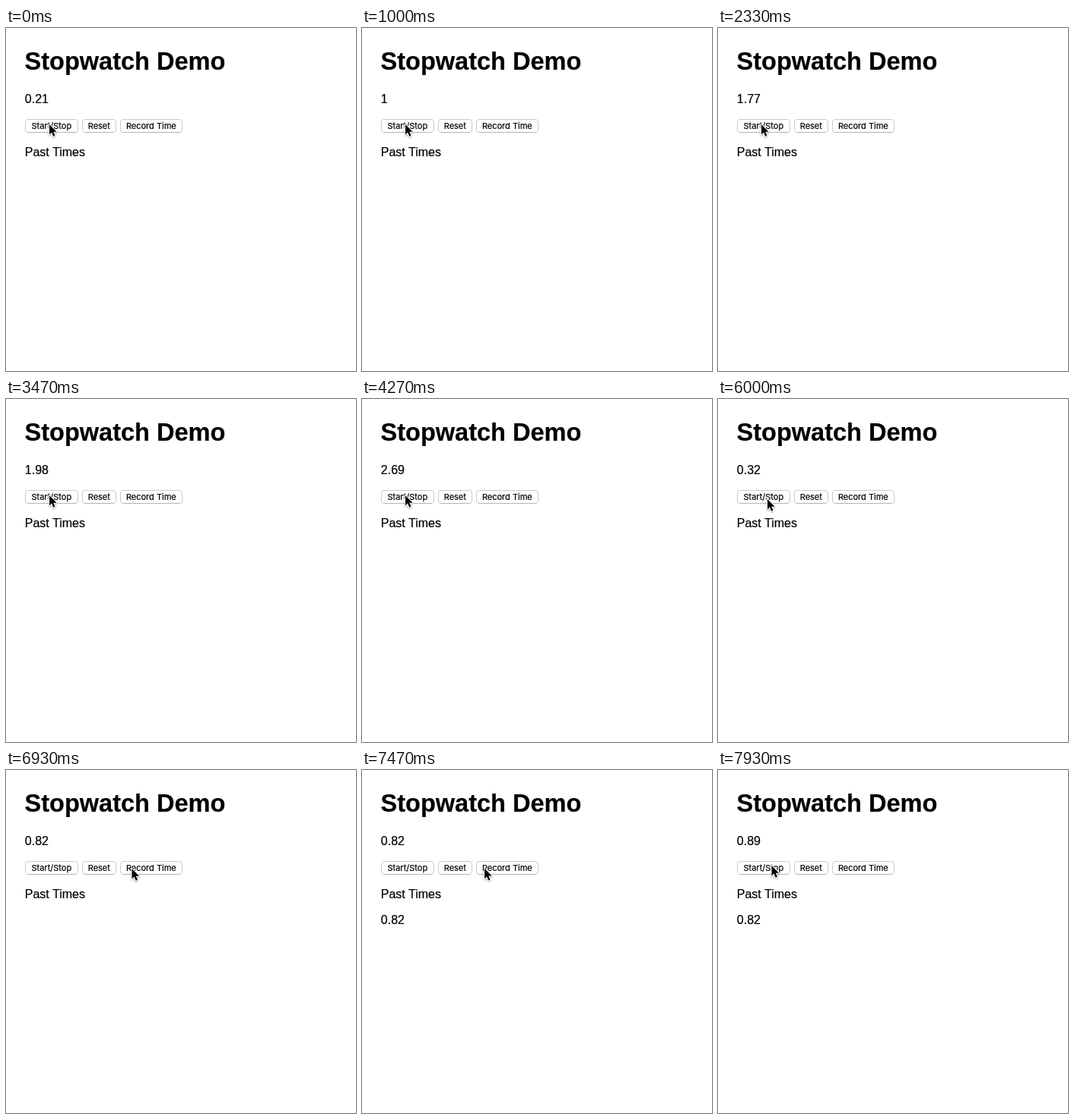
Write an HTML page that moves like this. It is 460 px wide and 452 px high and loops after 8000 ms.

```html
<!DOCTYPE html>
<html lang="en">
<head>
<meta charset="utf-8">
<title>Stopwatch Demo</title>
<style>
  html, body { margin: 0; width: 100%; height: 100%; overflow: hidden; background: #fff; }
  svg { display: block; width: 460px; height: 452px; }
  text { font: 16px "Liberation Sans", Arial, sans-serif; stroke: #000; stroke-width: .2px; }
  .title { font-size: 32.5px; font-weight: bold; }
  .button text { font: 11px Inter, sans-serif; text-anchor: middle; }
  .button rect { fill: #fff; stroke: #cbcbcb; }
  .button path { stroke: #b4b4b4; }
  .pressed rect { fill: url(#blue); stroke: #3d8df5; }
  .pressed path { stroke: #0a52d0; }
  .pressed text { fill: #fff; stroke: #fff; }
  #cursor { filter: drop-shadow(0 1px 1px rgba(0, 0, 0, .35)); }
  #cursor path { stroke: #fff; stroke-width: 2; stroke-linejoin: round; paint-order: stroke; }
</style>
</head>
<body>
<svg viewBox="0 0 460 452">
  <defs>
    <linearGradient id="blue" x2="0" y2="1">
      <stop stop-color="#69b2fa"/>
      <stop offset="1" stop-color="#0d69fb"/>
    </linearGradient>
  </defs>
  <text class="title" x="24.6" y="55">Stopwatch Demo</text>
  <text id="time" x="24.8" y="99"></text>
  <g id="buttons"></g>
  <text x="24.8" y="169">Past Times</text>
  <text id="lap" x="24.8" y="203"></text>
  <g id="cursor"><path d="M0 0V13.4L3 10.6 5.2 15.8 7.5 14.8 5.3 9.8H9.6Z"/></g>
</svg>
<script>
  const LOOP = 8000, FRAME = 1000 / 15, HOLD = 135, TRAVEL = 280;
  const $ = id => document.getElementById(id);

  const button = (id, label, x, width) => `
    <g class="button" id="${id}">
      <rect x="${x + .5}" y="120.5" width="${width - 1}" height="17" rx="3.5"/>
      <path d="M${x + 3.5} 137.5h${width - 7}"/>
      <text x="${x + width / 2 - .2}" y="133">${label}</text>
    </g>`;
  $('buttons').innerHTML = button('start', 'Start/Stop', 25, 70)
    + button('reset', 'Reset', 100, 45)
    + button('record', 'Record Time', 150, 82);

  // Mouse releases: each click holds its button down for HOLD ms before.
  const clicks = [790, 1560, 2530, 3460, 4180, 5680, 6500, 7860]
    .map(at => ({ at, id: 'start' }))
    .concat({ at: 4930, id: 'reset' }, { at: 7260, id: 'record' })
    .sort((a, b) => a.at - b.at);

  const home = { x: 57, y: 127 };
  const moves = [
    { at: 4530, x: 121, y: 129 },
    { at: 5330, x: 65, y: 132 },
    { at: 6630, x: 165.5, y: 130 },
    { at: 7430, x: 70.5, y: 126 }
  ];

  // The stopwatch is already running when the loop begins.
  function stopwatch(t) {
    let elapsed = 210, since = 0, running = true, lap = null;
    const advance = to => {
      if (running) elapsed += to - since;
      since = to;
    };
    for (const { at, id } of clicks.filter(click => click.at <= t)) {
      advance(at);
      if (id === 'start') running = !running;
      if (id === 'reset') elapsed = 0;
      if (id === 'record') lap = elapsed;
    }
    advance(t);
    return { elapsed, lap };
  }

  function pointer(t) {
    let { x, y } = home;
    for (const move of moves) {
      const u = Math.min(1, Math.max(0, (t - move.at) / TRAVEL));
      const ease = u * u * (3 - 2 * u);
      x += (move.x - x) * ease;
      y += (move.y - y) * ease;
    }
    return [x, y];
  }

  const seconds = ms => Number((ms / 1000).toFixed(2));

  function draw(ms) {
    // The picture advances at 15 frames a second, on a 10 ms grid.
    const t = Math.floor((ms % LOOP + 4) / FRAME) * FRAME % LOOP;
    const { elapsed, lap } = stopwatch(t);
    $('time').textContent = seconds(elapsed);
    $('lap').textContent = lap === null ? '' : seconds(lap);
    $('cursor').setAttribute('transform', `translate(${pointer(t)})`);
    for (const el of $('buttons').children) {
      const down = clicks.some(({ at, id }) => id === el.id && t >= at - HOLD && t < at);
      el.classList.toggle('pressed', down);
    }
  }

  const begin = performance.now();
  function tick() {
    draw(performance.now() - begin);
    requestAnimationFrame(tick);
  }
  tick();
</script>
</body>
</html>
```
